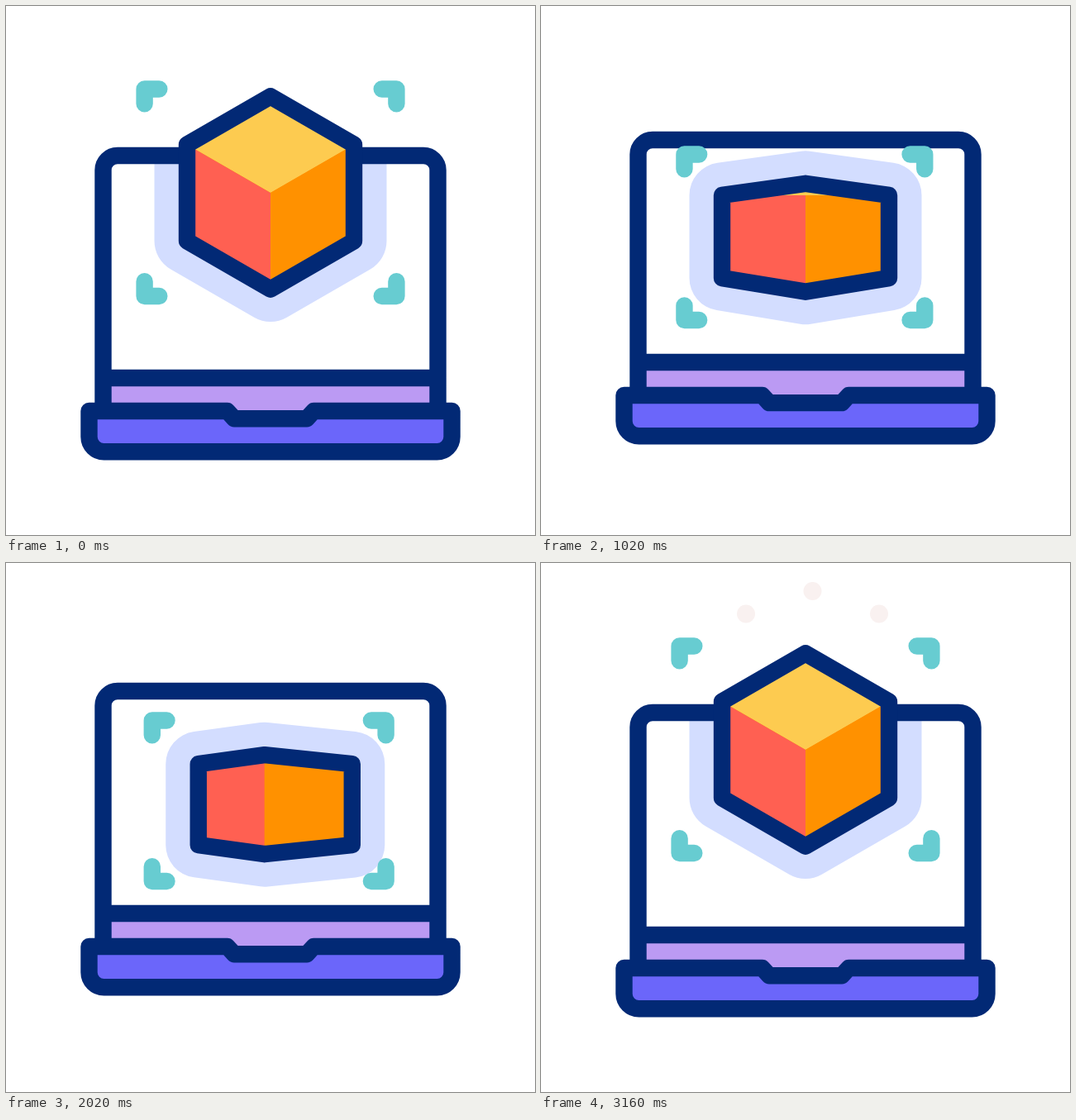
An HTML page with a canvas for the animation above (3300 ms loop, 640x640 px).

```html
<!DOCTYPE html>
<html lang="en">
<head>
<meta charset="utf-8">
<title>Cube on a laptop</title>
<style>
  html, body { margin: 0; width: 100%; height: 100%; overflow: hidden; background: #fff; }
  canvas { display: block; width: 640px; height: 640px; }
</style>
</head>
<body>
<canvas id="stage" width="640" height="640"></canvas>
<script>
const LOOP = 3300, MID = 320, LINE = 20.4;
const NAVY = '#022975', GLOW = '#d3ddff', TEAL = '#67ccd1', LILAC = '#bb9af3';
const VIOLET = '#6b66fa', YELLOW = '#fdcb50', RED = '#ff6052', ORANGE = '#ff9100';

const ctx = document.getElementById('stage').getContext('2d');
ctx.lineJoin = ctx.lineCap = 'round';

const mix = (a, b, p) => a + (b - a) * p;
const span = (t, from, to) => Math.min(1, Math.max(0, (t - from) / (to - from)));
const ease = (t, from, to) => (1 - Math.cos(Math.PI * span(t, from, to))) / 2;
const easeOut = (t, from, to) => 1 - (1 - span(t, from, to)) ** 3;

function pose(t) {
  // Wind up, land on the screen, turn right, turn left, lift off, settle
  const wind = ease(t, 360, 654), land = ease(t, 654, 1120);
  const rise = ease(t, 360, 675), fall = ease(t, 675, 1120);
  const right = ease(t, 1280, 1600), left = ease(t, 1730, 2180);
  const lift = ease(t, 2340, 2740), settle = ease(t, 2740, 2860);
  const frameShift = drop => -12 * wind + (drop + 12) * land - (drop + 24) * lift + 24 * settle;
  return {
    laptop: 39 * wind - 65 * land + 26 * lift,
    centre: 226 - 46 * rise + 112.2 * fall - 66.2 * lift,
    flat: fall - lift,
    frontX: 60 * right - 93 * left + 33 * lift,
    leftX: -101 + 19 * (left - lift),
    rightX: 101 - 8 * (right - left),
    upper: frameShift(90),
    lower: frameShift(34),
    squeeze: ease(t, 880, 1120) - ease(t, 1500, 1760) + ease(t, 1760, 2010) - ease(t, 2490, 2740)
  };
}

function trace(points, closed) {
  ctx.beginPath();
  points.forEach(([x, y]) => ctx.lineTo(x, y));
  if (closed) ctx.closePath();
}

function fill(points, colour) {
  trace(points, true);
  ctx.fillStyle = colour;
  ctx.fill();
}

function stroke(colour, width = LINE) {
  ctx.strokeStyle = colour;
  ctx.lineWidth = width;
  ctx.stroke();
}

// Convex outline of a few points
function hull(points) {
  const sorted = [...points].sort((a, b) => a[0] - b[0] || a[1] - b[1]);
  const half = list => {
    const out = [];
    for (const p of list) {
      while (out.length > 1) {
        const [a, b] = out.slice(-2);
        if ((b[0] - a[0]) * (p[1] - a[1]) - (b[1] - a[1]) * (p[0] - a[0]) > 0) break;
        out.pop();
      }
      out.push(p);
    }
    return out.slice(0, -1);
  };
  return [...half(sorted), ...half(sorted.reverse())];
}

function makeCube({ centre, flat, frontX, leftX, rightX }) {
  const edge = 116.6;
  const bow = 28 * flat * (1 - flat);
  const point = (x, tilted, level) => [MID + x, centre + mix(tilted, level, flat)];
  const front = point(frontX, bow, bow - 60), foot = point(frontX, edge, 60);
  const back = point(0, -edge - bow, -54 - bow);
  const side = x => [-1, 1].map(s => point(x, s * edge / 2, s * 49));
  const [l, lFoot] = side(leftX), [r, rFoot] = side(rightX);
  return {
    outline: hull([back, front, foot, l, lFoot, r, rFoot]),
    top: [l, back, r, front],
    left: [l, front, foot, lFoot],
    right: [front, r, rFoot, foot]
  };
}

function drawCube({ outline, top, left, right }) {
  fill(outline, ORANGE);
  fill(top, YELLOW);
  fill(left, RED);
  fill(right, ORANGE);
  trace(outline, true);
  stroke(NAVY);
}

function drawLaptop(dy, outline) {
  const l = 117.5, r = 640 - l, top = 181, bar = 450;
  ctx.save();
  ctx.translate(0, dy);
  ctx.fillStyle = LILAC;
  ctx.fillRect(l, bar, r - l, 45);

  ctx.save();
  ctx.beginPath();
  ctx.rect(l, top, r - l, bar - top);
  ctx.clip();
  ctx.translate(0, -dy);
  fill(outline, GLOW);
  stroke(GLOW, 79);
  ctx.restore();

  ctx.beginPath();
  ctx.moveTo(l, 488);
  ctx.arcTo(l, top, MID, top, 17.5);
  ctx.arcTo(r, top, r, 488, 17.5);
  ctx.lineTo(r, 488);
  ctx.moveTo(l, bar);
  ctx.lineTo(r, bar);
  stroke(NAVY);

  const rim = [[-219.5, 490], [-52.3, 490], [-44, 499.2]];
  const mirrored = rim.map(([x, y]) => [-x, y]).reverse();
  trace([...rim, ...mirrored].map(([x, y]) => [MID + x, y]));
  ctx.arcTo(MID + 219.5, 539.3, MID, 539.3, 18);
  ctx.arcTo(MID - 219.5, 539.3, MID - 219.5, 490, 18);
  ctx.closePath();
  ctx.fillStyle = VIOLET;
  ctx.fill();
  stroke(NAVY);
  ctx.restore();
}

// Three dots fly out from behind the cube and fade
function drawDots(t) {
  const fade = ease(t, 2940, 3160);
  ctx.fillStyle = `rgb(${[mix(255, 249, fade), mix(96, 241, fade), mix(82, 240, fade)]})`;
  for (const i of [-1, 0, 1]) {
    const dx = 8.5 + 80.5 * i, dy = 27.5 * i * i - 192;
    const far = Math.hypot(dx, dy), start = 2700 + 100 * i * i;
    if (t < start) continue;
    const k = mix(100 / far, 1, easeOut(t, start, 3160));
    ctx.beginPath();
    ctx.arc(MID + dx * k, 226 + dy * k, 11, 0, 2 * Math.PI);
    ctx.fill();
  }
}

function drawBrackets({ squeeze, upper, lower }) {
  const arm = 17.7;
  const corner = (x, y, sx, sy) => {
    trace([[x, y + arm * sy], [x, y], [x + arm * sx, y]]);
    stroke(TEAL);
  };
  for (const s of [1, -1]) {
    const x = MID - 152.4 * s + (11 * s - 1.8) * squeeze;
    corner(x, 100.5 + upper, s, 1);
    corner(x, 351 + lower, s, -1);
  }
}

function draw(t) {
  const now = pose(t);
  const cube = makeCube(now);
  ctx.fillStyle = '#fff';
  ctx.fillRect(0, 0, 640, 640);
  drawLaptop(now.laptop, cube.outline);
  drawDots(t);
  drawCube(cube);
  drawBrackets(now);
}

const begin = performance.now();
function tick() {
  draw((performance.now() - begin) % LOOP);
  requestAnimationFrame(tick);
}
tick();
</script>
</body>
</html>
```
